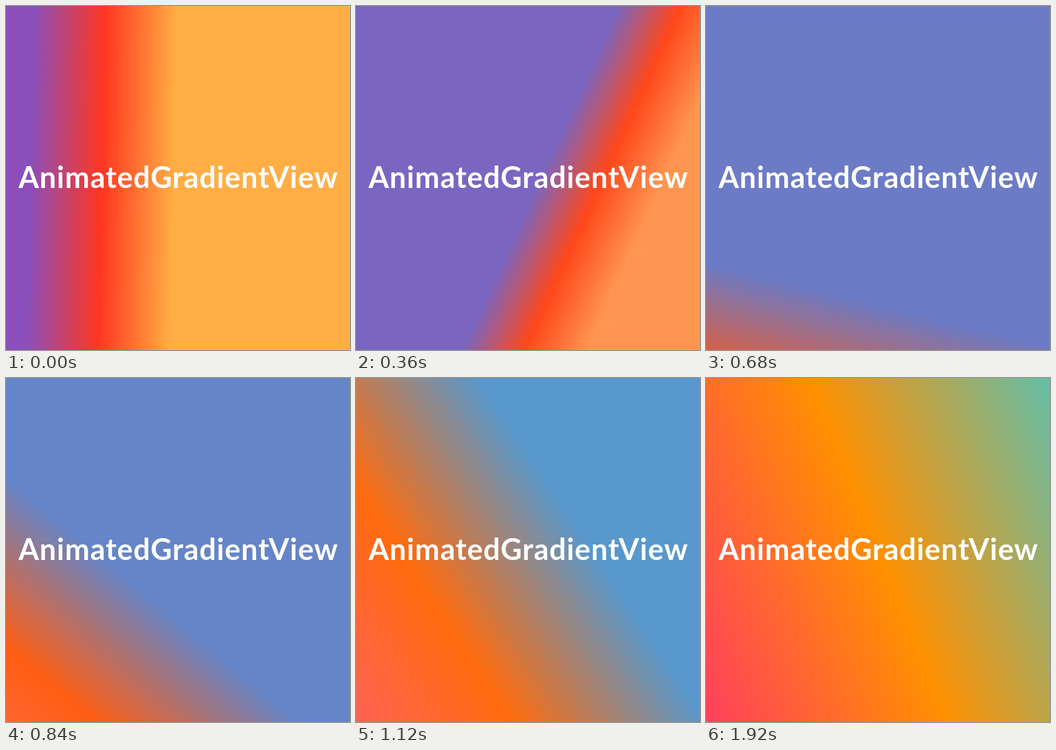
Animation, 549 px wide and 550 px high, one loop 1960 ms. Source, as an HTML page with a canvas:

```html
<!DOCTYPE html>
<html lang="en">
<head>
<meta charset="utf-8">
<title>AnimatedGradientView</title>
<style>
  html, body { margin: 0; width: 100%; height: 100%; overflow: hidden; }
  canvas, svg { position: absolute; left: 0; top: 0; display: block; }
  text { font: 700 47px Lato, "Open Sans", sans-serif; letter-spacing: 1px; fill: #fff; }
</style>
</head>
<body>
<canvas id="view" width="549" height="550"></canvas>
<svg width="549" height="550"><text x="20" y="291">AnimatedGradientView</text></svg>
<script>
const W = 549, H = 550, LOOP = 1960, STEP = 40;
const ASPECT = 2.16; // the gradient lives in a tall layer, so its normal is sheared

// each stop drifts from one colour to the other over the loop
const stops = [
  { from: [138, 79, 187], to: [51, 206, 217] },
  { from: [255, 54, 32], to: [255, 146, 0] },
  { from: [255, 174, 69], to: [255, 37, 122] }
];

const ctx = document.getElementById("view").getContext("2d");
const mix = (a, b, k) => a.map((v, i) => Math.round(v + (b[i] - v) * k));

function draw(ms) {
  const t = ms / 1000;
  // start point glides up and right while the direction swings from right to lower left
  const x = 28 + 323 * t, y = 750 - 408 * t;
  const dx = 230 - 341 * t - 40 * t * t, dy = 10 + 250 * t;

  // shear the direction into the tall layer, then span one full gradient length
  const nx = dx, ny = dy / ASPECT;
  const span = (dx * dx + dy * dy) / (nx * nx + ny * ny);
  const fill = ctx.createLinearGradient(x, y, x + nx * span, y + ny * span);
  stops.forEach(({ from, to }, i) =>
    fill.addColorStop(i / 2, `rgb(${mix(from, to, ms / LOOP)})`));
  ctx.fillStyle = fill;
  ctx.fillRect(0, 0, W, H);
}

const start = performance.now();
function tick() {
  const t = (performance.now() - start) % LOOP;
  draw(Math.floor(t / STEP) * STEP);
  requestAnimationFrame(tick);
}
tick();
</script>
</body>
</html>
```
